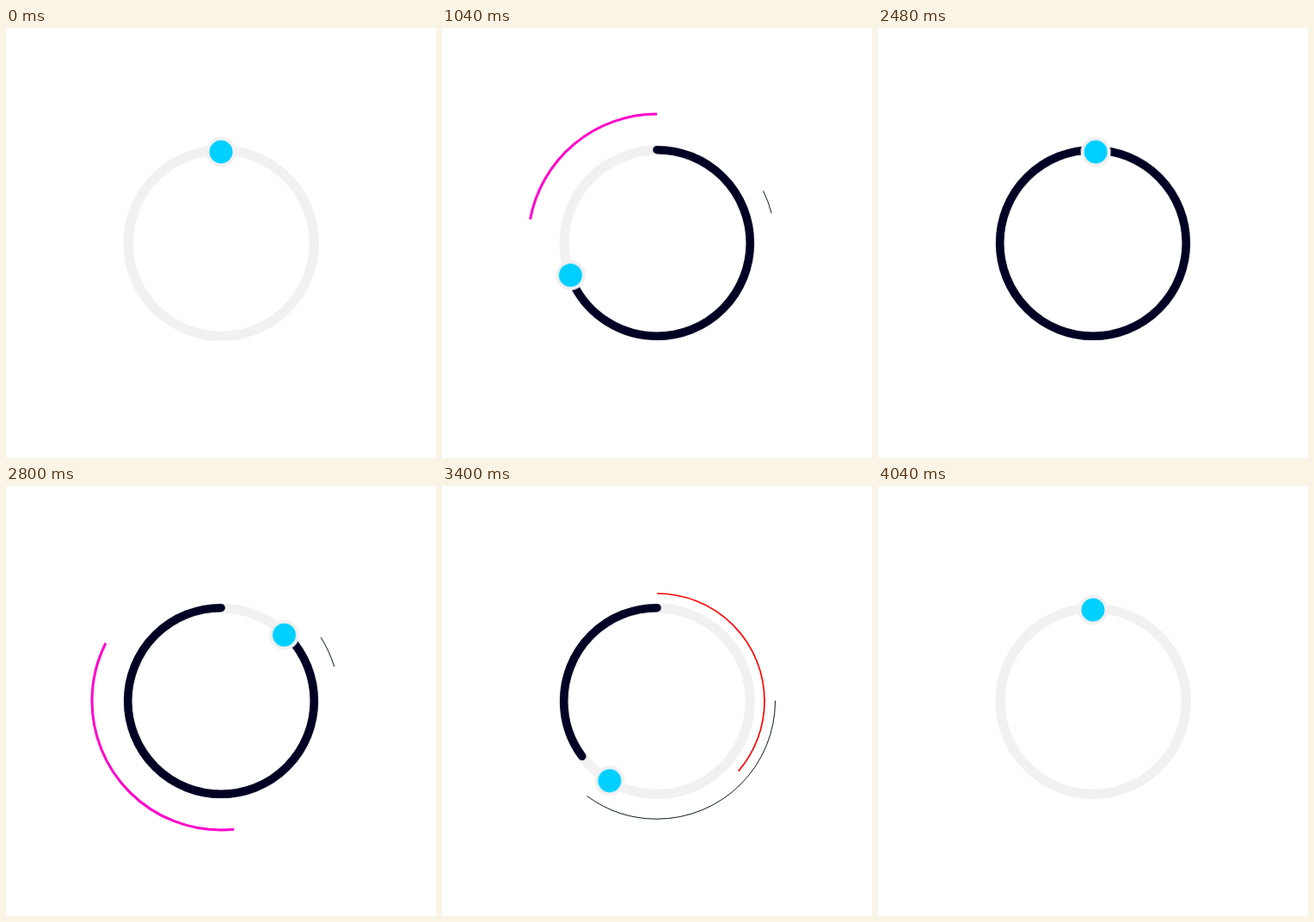
Animation of 500x500 px, one loop 4.52 s. Source, as an HTML page without scripts:

```html
<!DOCTYPE html>
<html lang="en">
<head>
<meta charset="utf-8">
<title>Progress ring</title>
<style>
  /* tail and head of an arc, in degrees along its circle */
  @property --tail { syntax: "<number>"; inherits: false; initial-value: 0; }
  @property --head { syntax: "<number>"; inherits: false; initial-value: 0; }

  html, body { margin: 0; width: 100%; height: 100%; overflow: hidden; background: #fff; }
  svg { display: block; width: 100vw; height: 100vh; }
  circle { fill: none; }

  .arc {
    stroke-dasharray: max(0px, calc((var(--head) - var(--tail)) * 1px)) 800px;
    stroke-dashoffset: calc(var(--tail) * -1px);
    animation: 4520ms cubic-bezier(.333, 0, .667, 1) infinite;
  }
  .track { stroke: #f2f0f1; stroke-width: 11.2; }
  .bar { stroke: #000224; stroke-width: 9.6; stroke-linecap: round; animation-name: bar-tail, bar-head; }
  .red { stroke: #f00; stroke-width: 1.7; animation-name: red-tail, red-head; }
  .thin { stroke: #0a1a1c; stroke-width: 1; animation-name: thin-tail, thin-head; }
  .pink { stroke: #ff00cc; stroke-width: 3; animation-name: pink-tail, pink-head; }

  .knob { transform-origin: 250px 251px; animation: knob 4520ms infinite; }
  .rim { fill: #f2f0f1; }
  .dot { fill: #00d0ff; }

  @keyframes knob {
    0% { transform: rotate(0deg); animation-timing-function: cubic-bezier(.333, 0, .64, 1); }
    37.168%, 53.982% { transform: rotate(361deg); animation-timing-function: cubic-bezier(.333, 0, .773, 1); }
    89.381%, 100% { transform: rotate(720deg); }
  }

  @keyframes bar-head {
    0% { --head: 0; }
    37.168%, 100% { --head: 360; }
  }
  @keyframes bar-tail {
    0%, 53.982% { --tail: 0; }
    89.381%, 100% { --tail: 360; }
  }

  @keyframes red-head {
    0%, 5.31% { --head: 0; }
    22.876%, 62.389% { --head: 360; }
    84.093%, 100% { --head: 0; }
  }
  @keyframes red-tail {
    0%, 13.717% { --tail: 0; }
    22.876%, 62.389% { --tail: 360; }
    74.779%, 100% { --tail: 0; }
  }

  @keyframes thin-head {
    0%, 1.106% { --head: 0; }
    26.04%, 58.296% { --head: 360; }
    86.504%, 100% { --head: 0; }
  }
  @keyframes thin-tail {
    0% { --tail: 0; }
    11.947% { --tail: 0; animation-timing-function: cubic-bezier(.333, 0, .55, 1); }
    25.885%, 58.96% { --tail: 360; }
    75.221%, 100% { --tail: 0; }
  }

  @keyframes pink-head {
    0%, 10.398% { --head: 0; }
    22.566%, 57.301% { --head: 360; }
    74.779%, 100% { --head: 0; }
  }
  @keyframes pink-tail {
    0%, 10.398% { --tail: 0; }
    28.54%, 57.301% { --tail: 360; }
    66.438%, 100% { --tail: 0; }
  }
</style>
</head>
<body>
<svg viewBox="0 0 500 500">
  <circle class="track" cx="250.2" cy="250.2" r="108.1"/>
  <circle class="arc thin" cx="250" cy="249.7" r="137.5" pathLength="360"/>
  <g transform="rotate(-90 250 250)">
    <circle class="arc bar" cx="250" cy="250" r="108.3" pathLength="360"/>
    <circle class="arc red" cx="250" cy="250" r="125" pathLength="360"/>
    <circle class="arc pink" cx="250" cy="250" r="150" pathLength="360"/>
  </g>
  <g class="knob">
    <circle class="rim" cx="250" cy="144" r="17.5"/>
    <circle class="dot" cx="250" cy="144" r="13.5"/>
  </g>
</svg>
</body>
</html>
```
